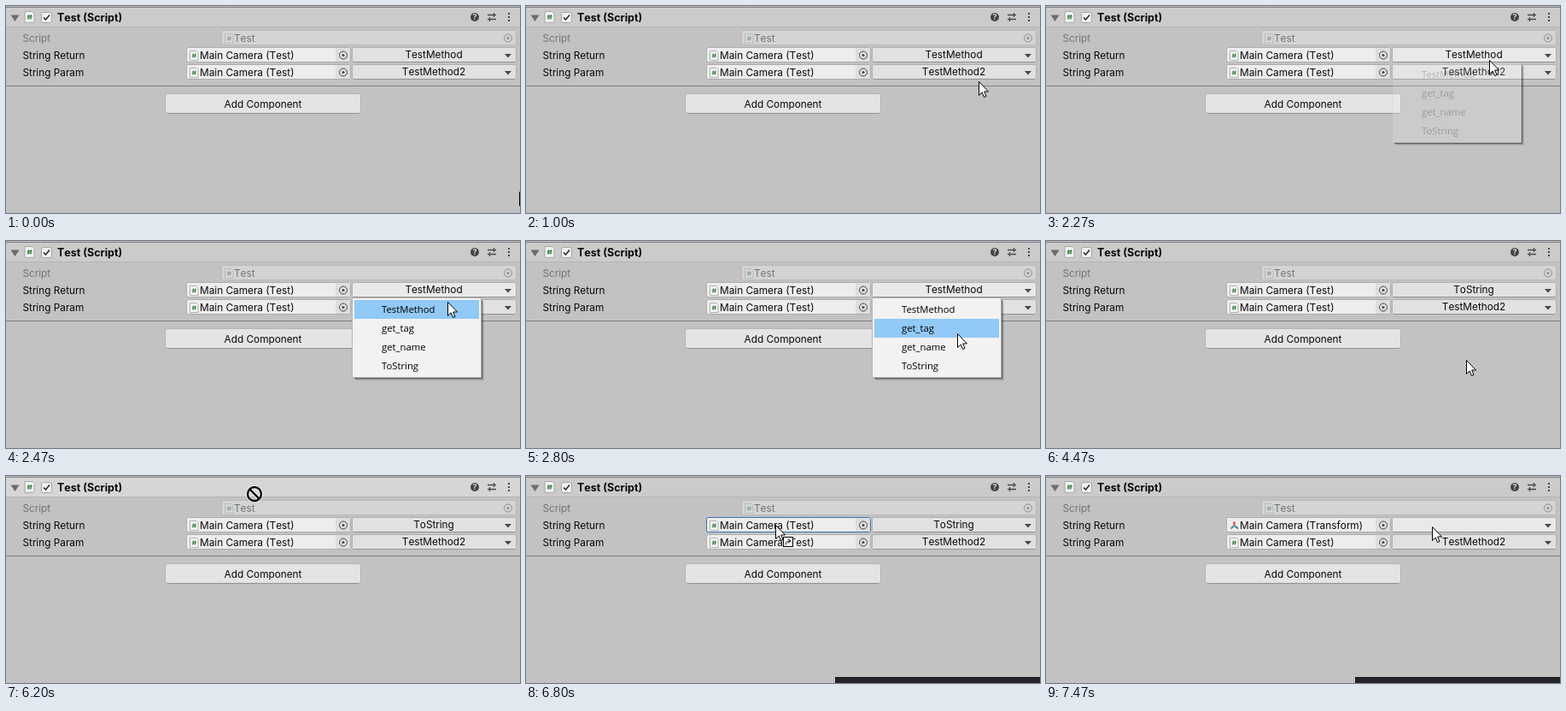
These frames come from a looping animation (602x242 px, 8000 ms). An HTML page:

```html
<!DOCTYPE html>
<html lang="en">
<head>
<meta charset="utf-8">
<title>Inspector method picker</title>
<style>
html, body { margin: 0; width: 100%; height: 100%; overflow: hidden; background: #c2c2c2; }
svg { display: block; font: 11.8px Inter, sans-serif; font-kerning: none; fill: #090909; cursor: default; }
.mid { text-anchor: middle; }
.menu text { font: 11.3px "Open Sans", "Noto Sans", sans-serif; fill: #000; }
.line { fill: none; stroke: #484848; }
</style>
</head>
<body>
<svg width="602" height="242" viewBox="0 0 602 242">
  <defs>
    <g id="script">
      <path d="M.5 .5h7.5l2 2v9h-9.500z" fill="#f6f6f6" stroke="#a0a0a0" stroke-width=".8"/>
      <path d="M4.600 3.500l-.7 5M6.900 3.500l-.7 5M3 5.100h5M2.700 7h5" fill="none" stroke="#2f7d3c" stroke-width=".9"/>
    </g>
    <g id="axes" fill="none" stroke-width="2" stroke-linecap="round">
      <path d="M5.500 5.500V2" stroke="#e0452f"/>
      <path d="M4.500 7L2 9" stroke="#3b9a72"/>
      <path d="M6.800 7L9.500 9" stroke="#2f78d0"/>
    </g>
    <g id="picker">
      <circle class="line" r="4.500"/>
      <circle r="1.500" fill="#484848"/>
    </g>
    <path id="arrow" d="M.5 .5V16.500L4.200 13 6.500 18.500 9 17.500 6.700 12H11.500Z" fill="#fff" stroke="#000"/>
    <path id="ban" d="M-5.600-5.600L5.600 5.600M8 0A8 8 0 1 1-8 0A8 8 0 1 1 8 0"/>
  </defs>

  <rect width="602" height="242" fill="#c2c2c2"/>
  <rect id="header" y="2" width="602" height="22" fill="#cbcbcb"/>
  <path d="M0 1.500H602M0 93.500H602" stroke="#7f7f7f"/>
  <path d="M0 24.500H602" stroke="#b4b4b4"/>

  <path d="M5.500 10.500h10l-5 7.500z" fill="#6c6c6c"/>
  <use href="#script" transform="translate(21.500 6) scale(1.150)"/>
  <rect x="41.500" y="7.500" width="12" height="12" rx="2" fill="#f0f0f0" stroke="#a4a4a4"/>
  <path d="M44 13.500l2.500 2.500 4.500-5.500" fill="none" stroke="#222" stroke-width="1.500"/>
  <text x="60" y="18" font-size="12.500" font-weight="700">Test (Script)</text>
  <circle cx="549" cy="13" r="5" fill="#444"/>
  <text class="mid" x="549" y="16.300" font-size="9" font-weight="700" style="fill:#d8d8d8">?</text>
  <path class="line" d="M564 10.500h10M564 15.500h10M571.500 8v5M566.500 13v5" stroke-width="1.300"/>
  <path d="M588 8h2v2h-2zM588 12h2v2h-2zM588 16h2v2h-2z" fill="#484848"/>

  <g opacity=".42">
    <text x="19.500" y="42">Script</text>
    <rect x="252.500" y="28.500" width="345" height="17" rx="2" fill="#ededed" stroke="#adadad"/>
    <use href="#script" x="256" y="32"/>
    <text x="267" y="42">Test</text>
    <use href="#picker" x="588" y="37.500"/>
  </g>

  <g id="rows"></g>

  <rect id="add" x="186.500" y="102.500" width="229" height="23" rx="3" stroke="#b2b2b2"/>
  <path d="M189 125.500H413" stroke="#939393"/>
  <text class="mid" x="301" y="119">Add Component</text>

  <g id="taskbar">
    <rect x="362" y="235" width="240" height="7" fill="#24262c"/>
    <path d="M362 235.500H602" stroke="#111317"/>
  </g>

  <g id="shadow" fill="none" stroke="#000">
    <path d="M557.500 69V160.500H408" opacity=".5"/>
    <path d="M558.500 70V161.500H409" opacity=".25"/>
    <path d="M559.500 71V162.500H410" opacity=".1"/>
  </g>
  <g id="menu" class="menu">
    <rect id="sheet" x="405.500" y="66.500" width="151" height="93" fill="#f2f2f2" stroke="#b4b4b4"/>
    <rect id="mark" x="408" width="146" height="22" fill="#91c9f7"/>
    <g id="items"></g>
  </g>

  <use id="pointer" href="#arrow"/>
  <g id="link">
    <use href="#arrow"/>
    <rect x="9.500" y="14.500" width="11" height="11" fill="#fff" stroke="#000"/>
    <path d="M12 23.500c0-3 1.500-4.500 5-4.500M14.500 16.500l3.500 2.500-3.500 2.500" fill="none" stroke="#000"/>
  </g>
  <g id="deny" fill="none">
    <use href="#ban" stroke="#fff" stroke-width="4"/>
    <use href="#ban" stroke="#000" stroke-width="2.400"/>
  </g>
</svg>
<script>
const $ = id => document.getElementById(id);
const set = (id, name, value) => $(id).setAttribute(name, value);
const show = (id, on) => set(id, "visibility", on ? "visible" : "hidden");
const place = (id, [x, y]) => set(id, "transform", `translate(${Math.round(x)} ${Math.round(y)})`);

const TICKS = 120, RATE = 15;
const ITEMS = ["TestMethod", "get_tag", "get_name", "ToString"];

// Pointer tip: tick, x, y
const PATH = [
  [5, 601, 217], [9, 572, 155], [13, 537, 98], [18, 519, 73], [19, 519, 66], [20, 519, 63],
  [36, 519, 63], [39, 513, 88], [42, 505, 108], [46, 504, 115], [52, 499, 132], [53, 498, 136],
  [58, 498, 136], [64, 498, 141], [66, 498, 141], [67, 492, 139], [69, 410, 114], [72, 211, 53],
  [105, 292, 57], [107, 335, 61], [110, 432, 63], [112, 452, 59]
];

function row(i, label, method) {
  const y = 48 + i * 20;
  return `<text x="19.5" y="${y + 14}">${label}</text>
    <rect id="field${i}" x="211.500" y="${y + .5}" width="192" height="17" rx="2" fill="#ededed" stroke="#adadad"/>
    <rect x="386" y="${y + 1}" width="17" height="16" fill="#dedede"/>
    <use id="icon${i}" href="#script" x="215" y="${y + 4}"/>
    <text id="object${i}" x="227" y="${y + 14}">Main Camera (Test)</text>
    <use href="#picker" x="395" y="${y + 9.5}"/>
    <rect id="drop${i}" x="405.500" y="${y + .5}" width="192" height="17" rx="2" stroke="#b0b0b0"/>
    <path d="M407 ${y + 17.5}H596" stroke="#939393"/>
    <text id="method${i}" class="mid" x="501" y="${y + 13}">${method}</text>
    <path d="M584 ${y + 8}h8l-4 4.500z" fill="#484848"/>`;
}
$("rows").innerHTML = row(0, "String Return", "TestMethod") + row(1, "String Param", "TestMethod2");
$("items").innerHTML = ITEMS.map((s, i) => `<text x="440" y="${84 + i * 22}">${s}</text>`).join("");

function along(tick) {
  const i = PATH.findIndex(p => p[0] >= tick);
  if (i <= 0) return (i ? PATH[PATH.length - 1] : PATH[0]).slice(1);
  const [a, b] = [PATH[i - 1], PATH[i]], k = (tick - a[0]) / (b[0] - a[0]);
  return [a[1] + k * (b[1] - a[1]), a[2] + k * (b[2] - a[2])];
}

function drawMenu(n, y) {
  const open = n >= 34 && n < 59, fading = n >= 59 && n < 64;
  const hit = fading ? 3 : Math.floor((y - 69) / 22);
  show("shadow", open);
  show("sheet", open);
  show("mark", (open && hit >= 0) || fading);
  set("mark", "y", 69 + Math.max(hit, 0) * 22);
  [...$("items").children].forEach((item, i) =>
    item.setAttribute("visibility", open || (fading && i === 3) ? "visible" : "hidden"));
  set("menu", "opacity", fading ? 1 - (n - 58) / 6 : Math.min(1, .2 + Math.max(0, n - 34) * .35));
  return open;
}

function draw(n) {
  const tip = along(n), [x, y] = tip;
  const free = n < 73 || n >= 105, denied = n >= 93 && n < 98, linked = n >= 98 && n < 105;
  show("pointer", free);
  place("pointer", tip);
  show("deny", denied);
  place("deny", n < 94 ? [291, 21] : [292, 43]);
  show("link", linked);
  place("link", [292, n < 99 ? 55 : 57]);
  set("header", "fill", n === 93 ? "#d6d6d6" : "#cbcbcb");

  const open = drawMenu(n, y);
  const over = (l, t, r, b) => free && !open && x >= l && x < r && y >= t && y < b;
  set("drop0", "fill", open || over(405, 48, 598, 67) ? "#e9e9e9" : "#e1e1e1");
  set("drop1", "fill", over(405, 68, 598, 87) ? "#e9e9e9" : "#e1e1e1");
  set("add", "fill", over(186, 102, 416, 126) ? "#ececec" : "#e4e4e4");

  const dropped = n >= 105;
  set("field0", "stroke", linked ? "#3a72b0" : "#adadad");
  set("icon0", "href", dropped ? "#axes" : "#script");
  $("object0").textContent = `Main Camera (${dropped ? "Transform" : "Test"})`;
  $("method0").textContent = dropped ? "" : n < 60 ? "TestMethod" : "ToString";
  show("taskbar", n >= 102);
}

function frame() {
  draw(Math.floor((performance.now() + 4) * RATE / 1000) % TICKS);
  requestAnimationFrame(frame);
}
frame();
</script>
</body>
</html>
```
